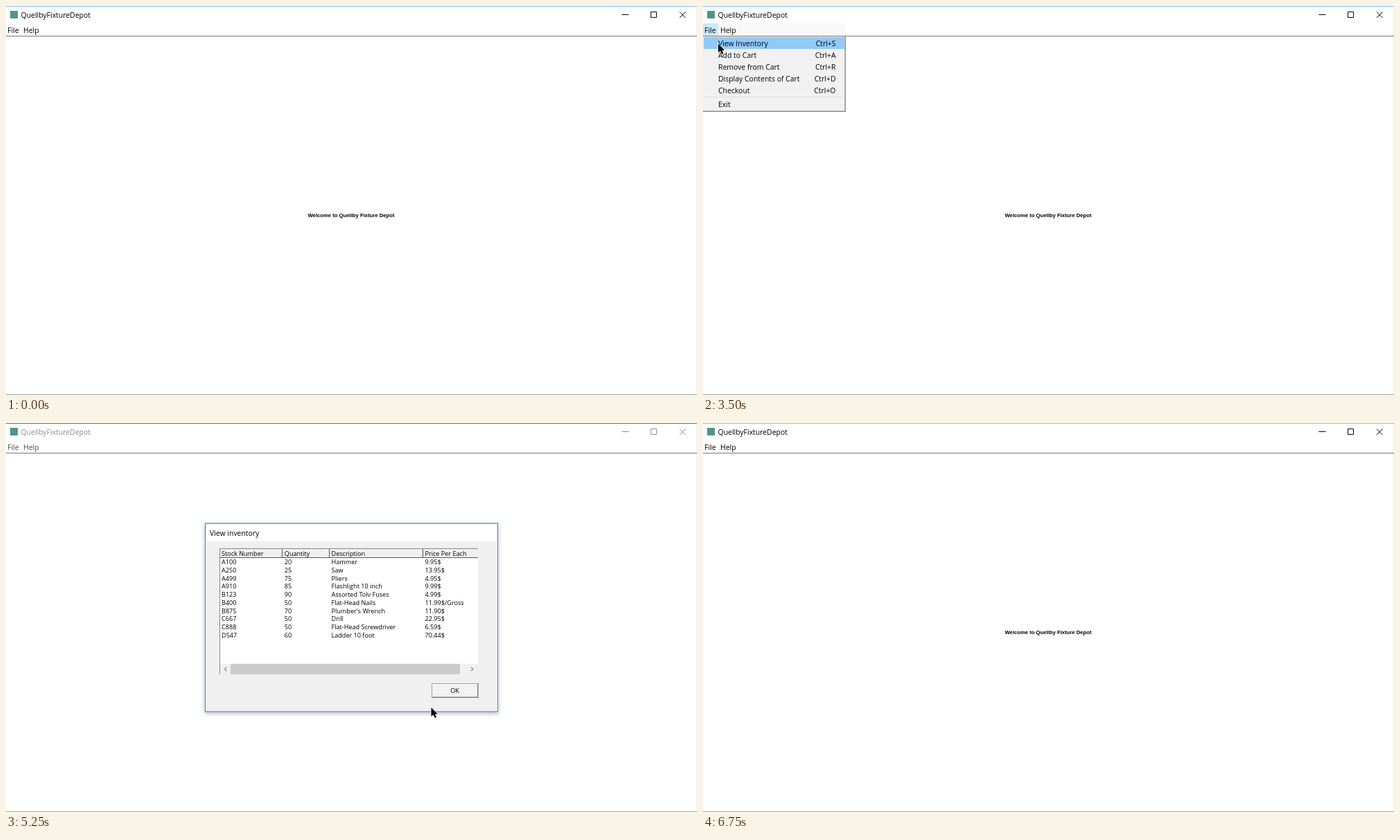
Recreate the animation shown at these times as an HTML page. Size 997 by 562 pixels, loop 7250 ms.

```html
<!DOCTYPE html>
<html lang="en">
<head>
<meta charset="utf-8">
<title>Store window</title>
<style>
html, body { margin: 0; width: 100%; height: 100%; overflow: hidden; background: #fff; }
svg { display: block; width: 997px; height: 562px; }
text { font: 10.45px "Open Sans", "Noto Sans", sans-serif; fill: currentColor; }
.end { text-anchor: end; }
.mid { text-anchor: middle; }
.small text { font-size: 9.1px; }
.welcome { font: bold 7.7px "Liberation Sans", Arial, sans-serif; }
.line { fill: none; stroke: currentColor; }

/* 29 steps of 250 ms */
.caption, .labels, .edge, .bar, .menu, .pick, .ghost, .dialog, .cursor {
  animation: 7250ms step-end infinite;
}
.caption { animation-name: caption; }
.labels { animation-name: labels; }
.edge { animation-name: edge; }
.bar { animation-name: bar; }
.menu { animation-name: menu; }
.pick { animation-name: pick; }
.ghost { animation-name: ghost; }
.dialog { animation-name: dialog; transform-origin: 498px 281px; }
.cursor { animation-name: cursor; }

@keyframes caption { 0%, 89.655% { color: #000; } 51.724% { color: #8c8c8c; } }
@keyframes labels { 0%, 89.655% { color: #000; } 51.724% { color: #4c4c4c; } }
@keyframes edge { 0%, 89.655% { fill: #83bfee; } 51.724% { fill: #4a78a8; } }
@keyframes bar { 0%, 51.724% { opacity: 0; } 31.034% { opacity: 1; } }
@keyframes menu { 0%, 51.724% { opacity: 0; } 31.034% { opacity: .65; } 34.482% { opacity: 1; } }
@keyframes pick { 0%, 51.724% { opacity: 0; } 41.379% { opacity: 1; } }
@keyframes ghost { 0%, 55.172% { opacity: 0; } 51.724% { opacity: .45; } }
@keyframes dialog {
  0%, 93.103% { opacity: 0; }
  51.724% { opacity: .5; transform: scale(.98); }
  55.172% { opacity: 1; transform: none; }
  89.655% { opacity: .3; transform: scale(.98); }
}
@keyframes cursor {
  0% { transform: translate(-40px, 0); }
  3.448% { transform: translate(214px, 32px); }
  10.344% { transform: translate(32px, 34px); }
  13.793% { transform: translate(11px, 38px); }
  17.241% { transform: translate(8px, 35px); }
  20.689% { transform: translate(6.5px, 33.5px); }
  41.379% { transform: translate(16px, 48px); }
  44.827% { transform: translate(22px, 52px); }
  48.275% { transform: translate(22px, 54.5px); }
  58.62% { transform: translate(77px, 61px); }
  62.068% { transform: translate(437px, 261px); }
  65.517% { transform: translate(474px, 297px); }
  68.965% { transform: translate(650px, 416px); }
  72.413% { transform: translate(613.5px, 411px); }
  75.862% { transform: translate(632.5px, 396px); }
  79.31% { transform: translate(636px, 391.5px); }
  82.758% { transform: translate(636px, 389px); }
  86.206% { transform: translate(636px, 388px); }
  93.103%, 100% { transform: translate(-40px, 0); }
}
</style>
</head>
<body>
<svg viewBox="0 0 997 562">
  <rect width="997" height="562" fill="#fff"/>
  <rect class="edge" width="997" height="1"/>
  <rect x="996" y="1" width="1" height="560" fill="#ededed"/>
  <rect y="561" width="997" height="1" fill="#a4a4a4"/>

  <rect x="6" y="7" width="11" height="11" fill="#4f948c"/>
  <g class="caption">
    <text x="21.5" y="17">QuellbyFixtureDepot</text>
    <path class="line" d="M888.5 12.5h10M930.5 8.5h8v8h-8zM972 8.5l8.5 8.5m0-8.5l-8.5 8.5"/>
  </g>

  <g class="bar">
    <rect y="25" width="206" height="18" fill="#f8f8f8"/>
    <rect y="25" width="22" height="18" fill="#cce8ff"/>
  </g>
  <g class="labels">
    <text x="2" y="38.8">File</text>
    <text x="25" y="38.8">Help</text>
  </g>
  <rect y="43" width="997" height="1" fill="#777"/>

  <text class="welcome mid" x="498" y="305">Welcome to Quellby Fixture Depot</text>

  <g class="menu">
    <rect y="44" width="206" height="109" fill="#8c8c8c"/>
    <rect y="44" width="204.5" height="107.5" fill="#f1f1f1"/>
    <rect class="pick" x="1" y="45" width="203" height="17" fill="#91c9f7"/>
    <rect x="2" y="131" width="201" height="1" fill="#dcdcdc"/>
    <g id="items"></g>
  </g>
  <g class="ghost">
    <rect y="45" width="204" height="17" fill="#91c9f7"/>
    <text x="22" y="57.5">View Inventory</text>
    <text class="end" x="191.5" y="57.5">Ctrl+S</text>
  </g>

  <g class="dialog">
    <rect x="287" y="144.5" width="423" height="273" fill="#4793d1" style="filter:drop-shadow(0 2px 3px rgba(0,0,0,.3))"/>
    <rect x="288.3" y="145.8" width="420.4" height="270.4" fill="#fff"/>
    <rect x="288.3" y="171" width="420.4" height="245.2" fill="#f0f0f0"/>
    <text x="294" y="162.5">View inventory</text>

    <rect x="308" y="181" width="373" height="182" fill="#fff"/>
    <rect x="309" y="182" width="372" height="12" fill="#f0f0f0"/>
    <path class="line" stroke-width="1" d="M308 181.5H681M308.5 181V363" style="color:#858585"/>
    <path class="line" d="M309 194.5H681M398.5 182v12M466.5 182v12M601.5 182v12" style="color:#555"/>
    <rect x="309" y="348" width="372" height="15" fill="#f0f0f0"/>
    <rect x="324" y="348" width="331" height="15" fill="#cbcbcb"/>
    <path class="line" d="M318.5 353l-3 2.6 3 2.6M671 353l3 2.6-3 2.6" style="color:#444"/>
    <g id="table" class="small"></g>

    <rect x="614" y="376" width="67.5" height="21" fill="#6c6c6c"/>
    <rect x="614" y="376" width="66.5" height="20" fill="#a0a0a0"/>
    <rect x="615" y="377" width="65" height="18.5" fill="#f2f2f2"/>
    <g class="small"><text class="mid" x="647.5" y="390.3">OK</text></g>
  </g>

  <path class="cursor" d="M0 0V13L3 10.2 5.2 15 7.5 14 5.3 9.4H9.4Z" stroke="#fff" stroke-width="1.4" paint-order="stroke"/>
</svg>
<script>
function put(id, x, y, label, cls) {
  const el = document.createElementNS("http://www.w3.org/2000/svg", "text");
  el.setAttribute("x", x);
  el.setAttribute("y", y);
  if (cls) el.setAttribute("class", cls);
  el.textContent = label;
  document.getElementById(id).append(el);
}

["View Inventory|S", "Add to Cart|A", "Remove from Cart|R",
 "Display Contents of Cart|D", "Checkout|O", "Exit"].forEach((item, i) => {
  const [label, key] = item.split("|");
  const y = key ? 57.5 + 17.1 * i : 146;
  put("items", 22, y, label);
  if (key) put("items", 191.5, y, "Ctrl+" + key, "end");
});

const columns = [311, 401.8, 469.5, 604.5];
const row = (line, y) =>
  line.split("|").forEach((cell, i) => put("table", columns[i], y, cell));

row("Stock Number|Quantity|Description|Price Per Each", 191.9);
["A100|20|Hammer|9.95$",
 "A250|25|Saw|13.95$",
 "A499|75|Pliers|4.95$",
 "A910|85|Flashlight 10 inch|9.99$",
 "B123|90|Assorted Tolv Fuses|4.99$",
 "B400|50|Flat-Head Nails|11.99$/Gross",
 "B875|70|Plumber's Wrench|11.90$",
 "C667|50|Drill|22.95$",
 "C888|50|Flat-Head Screwdriver|6.59$",
 "D547|60|Ladder 10 foot|70.44$"].forEach((line, i) => row(line, 204.3 + 11.72 * i));
</script>
</body>
</html>
```
